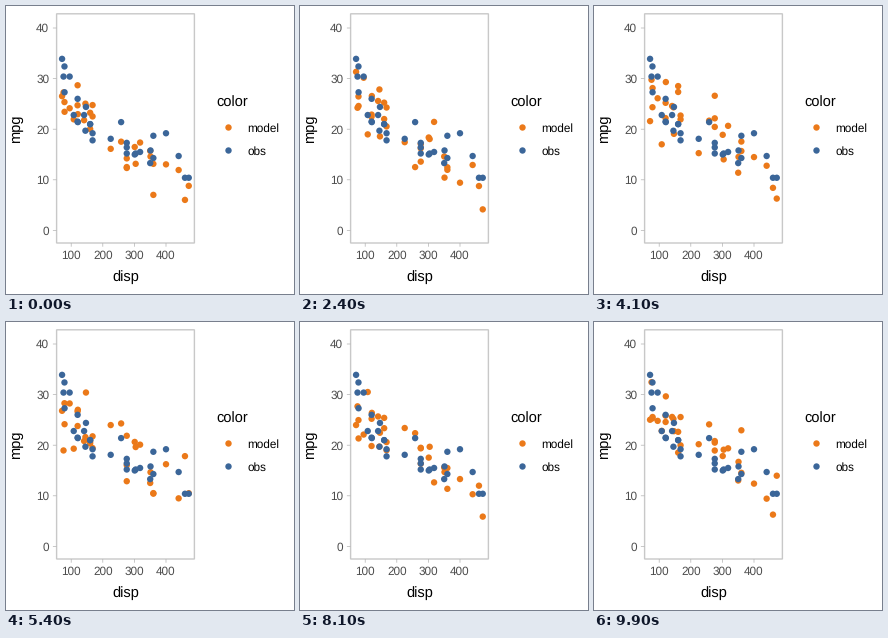
A matplotlib script for the animation above (10000 ms loop, 288 by 288 pixels).

```python
import numpy as np
import matplotlib.pyplot as plt
from matplotlib.animation import FuncAnimation
from matplotlib.patches import Rectangle

plt.rcParams["font.family"] = "Liberation Sans"
plt.rcParams["text.hinting"] = "none"

SIZE, DPI = 288, 96
PT = 72 / DPI
FRAMES, INTERVAL = 100, 100
LEFT, TOP, RIGHT, BOTTOM = 50.6, 7.8, 188.4, 237.0
MODEL, OBS = "#EB7919", "#3B6699"
BORDER, TICK_TEXT = "#C8C8C8", "#4D4D4D"

# mtcars, ordered by displacement
disp = np.array([71.1, 75.7, 78.7, 79, 95.1, 108, 120.1, 120.3, 121, 140.8, 145,
                 146.7, 160, 160, 167.6, 167.6, 225, 258, 275.8, 275.8, 275.8,
                 301, 304, 318, 350, 351, 360, 360, 400, 440, 460, 472])
mpg = np.array([33.9, 30.4, 32.4, 27.3, 30.4, 22.8, 21.5, 26, 21.4, 22.8, 19.7,
                24.4, 21, 21, 19.2, 17.8, 18.1, 21.4, 16.4, 17.3, 15.2,
                15, 15.2, 15.5, 13.3, 15.8, 18.7, 14.3, 19.2, 14.7, 10.4, 10.4])


def px(x):
    return 65.2 + (np.asarray(x) - 100) * 0.316


def py(y):
    return 224.4 - np.asarray(y) * 5.06


# One posterior predictive draw of the linear fit per frame
rng = np.random.default_rng(7)
draws = rng.normal(29.4 - 0.0405 * disp, 3.1, (FRAMES, disp.size)).clip(2.5, 36)

fig = plt.figure(figsize=(SIZE / DPI, SIZE / DPI), dpi=DPI, facecolor="white")
ax = fig.add_axes([0, 0, 1, 1])
ax.set(xlim=(0, SIZE), ylim=(SIZE, 0))
ax.axis("off")


def label(x, y, text, size=8.8, color="black", **kw):
    ax.text(x, y, text, fontsize=size, color=color, va="baseline", **kw)


def dots(x, y, color, z=3):
    # One size per dot keeps the centres off the pixel grid
    sizes = np.full(len(x), (6.4 * PT) ** 2)
    return ax.scatter(x, y, s=sizes, c=color, linewidths=0, zorder=z)


def tick(xs, ys):
    ax.plot(xs, ys, color="#B3B3B3", lw=0.71 * PT, solid_capstyle="butt",
            snap=False)


# Panel and axes
ax.add_patch(Rectangle((LEFT, TOP), RIGHT - LEFT, BOTTOM - TOP, fill=False,
                       ec=BORDER, lw=1.4 * PT, snap=False))
for v in range(100, 401, 100):
    tick([px(v)] * 2, [BOTTOM, BOTTOM + 3.7])
    label(px(v), 253, str(v), color=TICK_TEXT, ha="center")
for v in range(0, 41, 10):
    tick([LEFT - 3.7, LEFT], [py(v)] * 2)
    label(43.2, py(v) + 4.3, str(v), color=TICK_TEXT, ha="right")
label(119.4, 275.2, "disp", 11, ha="center")
label(14.4, 122.3, "mpg", 11, ha="center", rotation=90, rotation_mode="anchor")

# Legend
label(210.8, 100.9, "color", 11)
keys = [121.5, 144.5]
dots([222.5, 222.5], keys, [MODEL, OBS])
for y, name in zip(keys, ("model", "obs")):
    label(241.2, y + 4.2, name)

model = dots(px(disp), py(draws[0]), MODEL)
dots(px(disp), py(mpg), OBS, 4)


def update(i):
    model.set_offsets(np.column_stack([px(disp), py(draws[i])]))
    return (model,)


anim = FuncAnimation(fig, update, frames=FRAMES, interval=INTERVAL,
                     repeat=True, repeat_delay=0)
plt.show()
```
